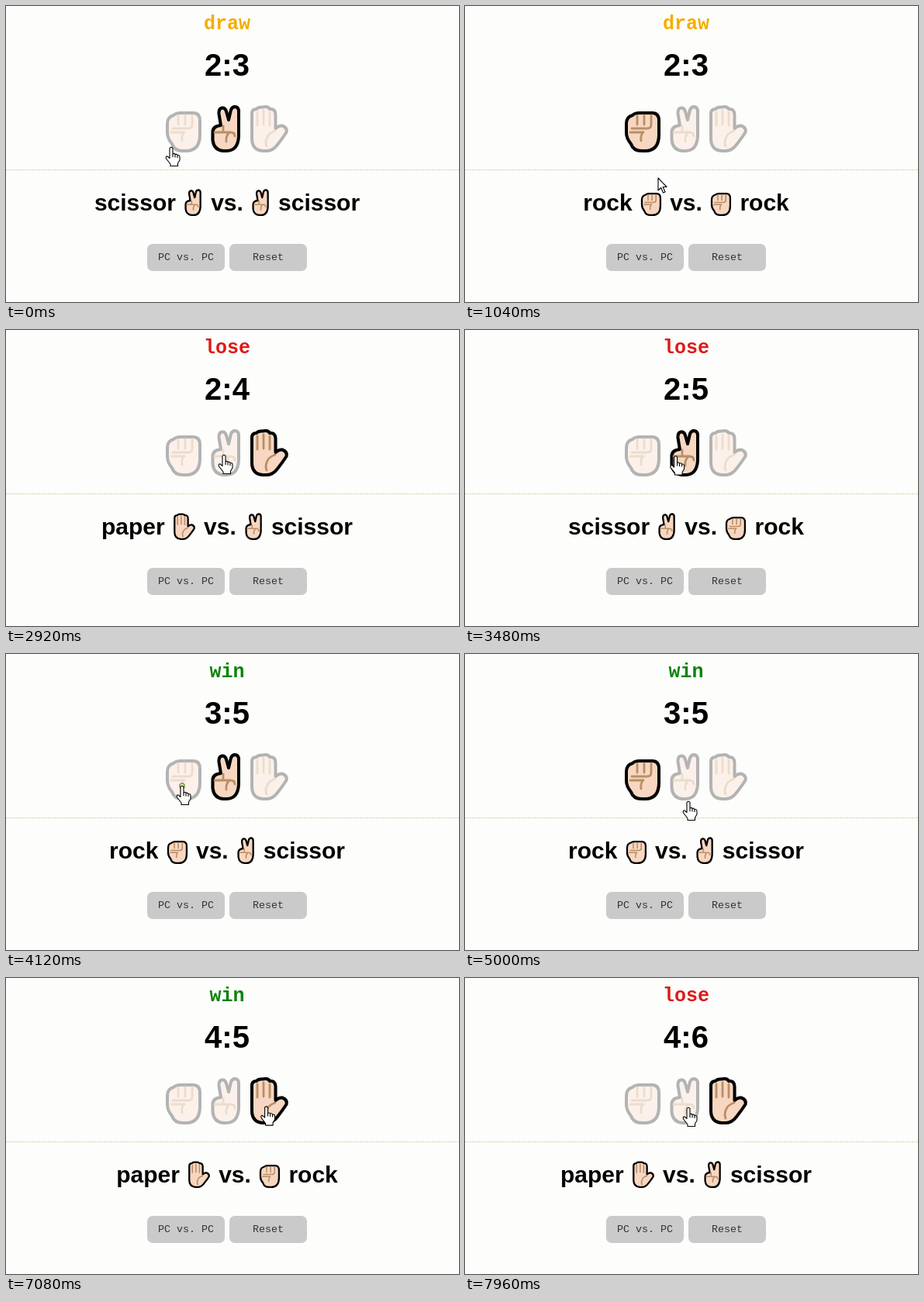
Animation, 584 px wide and 382 px high, one loop 8 s. Source, as an HTML page:

```html
<!DOCTYPE html>
<html lang="en">
<head>
<meta charset="utf-8">
<title>Rock, paper, scissor</title>
<style>
  html, body { margin: 0; width: 584px; height: 382px; overflow: hidden; background: #fdfdfb; }
  .layer { position: absolute; left: 0; top: 0; display: block; }
  text { text-anchor: middle; }
  #verdict { font: bold 25px "Liberation Mono", monospace; }
  #score { font: bold 40px "Liberation Sans", sans-serif; }
  .button rect { fill: #cacacb; }
  .button text { font: 13.333px "Liberation Mono", monospace; fill: #333; }
  #result {
    position: absolute; left: 0; top: 238.5px; width: 570px; height: 30px;
    display: flex; justify-content: center; gap: 8.34px;
    font: bold 30px/30px "Liberation Sans", sans-serif; white-space: nowrap;
  }
  #result svg { flex: none; margin-top: -4.5px; height: 40px; }
  .hand { stroke-linecap: round; stroke-linejoin: round; }
  .bright { --skin: #f7d7c1; --edge: #000; --crease: #b98f66; }
  .dim { --skin: #fbf1ea; --edge: #b3b3b3; --crease: #ecdccc; }
  .outline { fill: var(--skin); stroke: var(--edge); stroke-width: 4; }
  .crease { fill: none; stroke: var(--crease); stroke-width: 2.8; }
  #pointer path { fill: #fff; stroke: #000; stroke-width: 1.1; stroke-linejoin: round; }
</style>
</head>
<body>
<svg class="layer" width="584" height="382" viewBox="0 0 584 382">
  <defs>
    <g id="rock" class="hand">
      <path class="outline" d="M208 152 Q208 143 216 141 Q219 138 225 138 H241 Q250 138 250 148 V166
        Q250 187 232 187 H228 Q217 187 214 178 Q208 171 208 163 Z"/>
      <path class="crease" d="M222 142 V153 M231 141 V153 M240 141 V153 Q240 158 235 158 H215
        M213 163 H230 Q226 166 227 174"/>
    </g>
    <g id="scissor" class="hand">
      <path class="outline" d="M277 154 L274.500 139 Q274 132.500 278.500 131.500 Q282.500 131 284 136 L287 147 L290 134
        Q291.500 130 295.500 130 Q300.500 131 300 137 V168 Q299 187 284 187 H280 Q268 186 266.500 173 V163
        Q266.500 155 277 154 Z"/>
      <path class="crease" d="M280 155 V161 M269 163 H289 Q295 163 295 168 M288 163 Q283 168 284 175"/>
    </g>
    <g id="paper" class="hand">
      <path class="outline" d="M317 139 Q317 133 323 133 Q325 130 331 130.500 Q338 129 340 133 Q347 132 347.500 140
        V158 Q352 154 356 154.500 Q363 157 361.500 163 Q357 170 350 179 Q344 187 336 187 H331 Q317 186 317 171 Z"/>
      <path class="crease" d="M324 137 V154 M332 135 V153 M340 137 V154 M347 161 Q338 164 336 171 Q334 176 336 181"/>
    </g>
  </defs>

  <text id="verdict" x="285" y="30"></text>
  <text id="score" x="285" y="90"></text>
  <g id="choices"></g>
  <path d="M0 211.500 H584" stroke="#d4d4a4" stroke-dasharray="2 1"/>
  <g class="button"><rect x="182" y="307" width="100" height="35" rx="7"/><text x="232" y="328">PC vs. PC</text></g>
  <g class="button"><rect x="288" y="307" width="100" height="35" rx="7"/><text x="338" y="328">Reset</text></g>
</svg>
<div id="result"></div>
<svg class="layer" width="584" height="382" viewBox="0 0 584 382">
  <circle id="ring" fill="none" stroke="#6a9a20" stroke-width="1.500"/>
  <g id="pointer">
    <path id="finger" d="M-2 1.500 Q0 -1 2 1.500 V9 Q4 7.500 5 9.500 Q7 8.500 8 10.500 Q11 10 11 13 V17
      L8.500 21 V24.500 H-1 V22 L-6.500 15 Q-7.500 12 -5 11.800 L-2 14.500 Z M2 9 V13 M5 9.500 V13.500 M8 10.500 V14"/>
    <path id="arrow" d="M0 0 V16 L3.700 12.500 L6.500 19 L9 18 L6.200 11.500 H11 Z"/>
  </g>
</svg>

<script>
const LOOP = 8000;
const COLORS = { draw: '#f5ad00', lose: '#dc1a18', win: '#0a830a' };

// left edge and width of each choice
const BOXES = { rock: [201, 56], scissor: [258.5, 50], paper: [309.5, 59] };

// time, player, computer, verdict, score
const ROUNDS = [
  [-1000, 'scissor', 'scissor', 'draw', '2:3'],
  [380, 'rock', 'rock', 'draw', '2:3'],
  [2100, 'paper', 'scissor', 'lose', '2:4'],
  [3080, 'scissor', 'rock', 'lose', '2:5'],
  [4100, 'rock', 'scissor', 'win', '3:5'],
  [5300, 'scissor', 'scissor', 'draw', '3:5'],
  [6300, 'paper', 'rock', 'win', '4:5'],
  [7300, 'paper', 'scissor', 'lose', '4:6']
];

// time, x, y
const TRACK = [
  [0, 213, 182], [300, 223, 170], [560, 223, 170], [1040, 249, 222], [1350, 270, 226],
  [1950, 338, 166], [2350, 338, 166], [2850, 281, 161], [3300, 281, 161],
  [3980, 227, 170], [4450, 227, 170], [5000, 288, 190], [5220, 285, 172], [5600, 285, 172],
  [6150, 334, 164], [7450, 336, 166], [7900, 288, 167], [8000, 288, 167]
];

const get = id => document.getElementById(id);
const clamp = v => Math.max(0, Math.min(1, v));
const smooth = v => v * v * (3 - 2 * v);

get('choices').innerHTML = Object.keys(BOXES).map(name =>
  `<use href="#${name}" class="dim"/><use href="#${name}" class="bright" id="lit-${name}"/>`).join('');

const icon = name => {
  const [x, width] = BOXES[name];
  return `<svg class="bright" width="${width * 0.57}" viewBox="${x} 124 ${width} 70"><use href="#${name}"/></svg>`;
};

function showRound([, player, computer, verdict, score]) {
  get('verdict').textContent = verdict;
  get('verdict').setAttribute('fill', COLORS[verdict]);
  get('score').textContent = score;
  get('result').innerHTML =
    `<span>${player}</span>${icon(player)}<span>vs.</span>${icon(computer)}<span>${computer}</span>`;
}

function pointerAt(time) {
  const next = Math.max(1, TRACK.findIndex(p => p[0] > time));
  const [t0, x0, y0] = TRACK[next - 1];
  const [t1, x1, y1] = TRACK[next];
  const k = smooth(clamp((time - t0) / (t1 - t0)));
  return [x0 + (x1 - x0) * k, y0 + (y1 - y0) * k];
}

let shown = -1;

function render(time) {
  const index = ROUNDS.findLastIndex(r => r[0] <= time);
  if (index !== shown) showRound(ROUNDS[shown = index]);

  const age = time - ROUNDS[index][0];
  const fade = smooth(clamp((age - 50) / 150));
  const current = ROUNDS[index][1];
  const previous = ROUNDS[Math.max(0, index - 1)][1];
  for (const name in BOXES) {
    const from = +(name === previous), to = +(name === current);
    get('lit-' + name).style.opacity = from + (to - from) * fade;
  }

  const [x, y] = pointerAt(time);
  const overHand = x > 201 && x < 368 && y < 200;
  get('pointer').setAttribute('transform', `translate(${x} ${y})`);
  get('finger').style.display = overHand ? '' : 'none';
  get('arrow').style.display = overHand ? 'none' : '';

  const ring = get('ring');
  ring.setAttribute('cx', x);
  ring.setAttribute('cy', y);
  ring.setAttribute('r', 2.5 + clamp(age / 240) * 7);
  ring.style.opacity = clamp(1 - age / 240);
}

function tick() {
  render(performance.now() % LOOP);
  requestAnimationFrame(tick);
}
tick();
</script>
</body>
</html>
```
